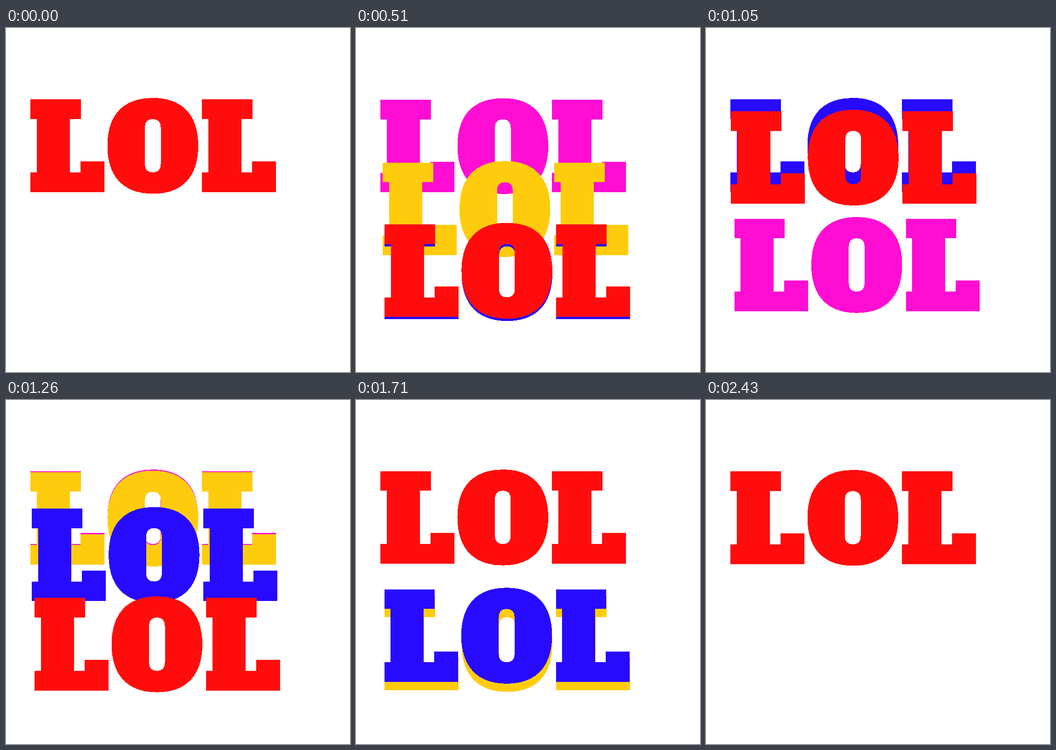
Animation, 748 px wide and 748 px high, one loop 2550 ms. Source, as an HTML page:

```html
<!DOCTYPE html>
<html lang="en">
<head>
<meta charset="utf-8">
<title>LOL</title>
<style>
  html, body { margin: 0; width: 100%; height: 100%; overflow: hidden; background: #fff; }
  svg { display: block; width: 100vw; height: 100vh; shape-rendering: crispEdges; }
</style>
</head>
<body>
<svg viewBox="0 0 748 748" role="img" aria-label="LOL">
  <defs>
    <path id="l" d="M53.400 155.400H163V198H139V314H162V290.300H214V356.500H53.400V314H67V198H53.400Z"/>
    <path id="o" fill-rule="evenodd" d="M220.500 256C220.500 190 254 152 319.300 152S418 190 418 256S384.500 360.500 319.300 360.500S220.500 322 220.500 256Z
      M302 216V296C302 308 308 314 319.300 314S336.500 308 336.500 296V216C336.500 204 330.500 198 319.300 198S302 204 302 216Z"/>
    <g id="word"><use href="#l"/><use href="#o"/><use href="#l" x="373"/></g>
  </defs>
  <use class="layer" href="#word" fill="#ff0dd3"/>
  <use class="layer" href="#word" fill="#ffcc0d"/>
  <use class="layer" href="#word" fill="#280aff"/>
  <use class="layer" href="#word" fill="#ff0d0d"/>
</svg>
<script>
  const STEP = 30, LOOP = 2550, LAST = 81;
  const DROP = 274.5, SLANT = 9 / 274.5, DOWN = 15.5, UP = 14;
  const layers = document.querySelectorAll('.layer');

  // Steps at which each layer sets off: down, up, down, up
  const starts = [
    [16.2, 32, 46.7, 62.9],
    [10.95, 26.5, 40.8, 56.4],
    [5.5, 21, 36.5, 53.8],
    [0, 15.5, 31, 47]
  ];

  const bezier = (a, b, s) => 3 * a * s * (1 - s) ** 2 + 3 * b * s * s * (1 - s) + s ** 3;

  // Slow start, fast middle, slight overshoot
  function ease(p) {
    if (p <= 0) return 0;
    if (p >= 1) return 1;
    let lo = 0, hi = 1;
    for (let i = 0; i < 24; i++) {
      const mid = (lo + hi) / 2;
      if (bezier(0.7, 0.03, mid) < p) lo = mid; else hi = mid;
    }
    return bezier(0, 1.155, lo);
  }

  function offset(times, n) {
    const k = times.filter(t => t <= n).length - 1;
    if (k < 0) return 0;
    const since = n - times[k];
    return DROP * (k % 2 ? 1 - ease(since / UP) : ease(since / DOWN));
  }

  function draw() {
    const n = Math.min(LAST, Math.floor(performance.now() % LOOP / STEP));
    layers.forEach((layer, i) => {
      const y = offset(starts[i], n);
      layer.setAttribute('transform', `translate(${y * SLANT} ${y})`);
    });
    requestAnimationFrame(draw);
  }
  draw();
</script>
</body>
</html>
```
